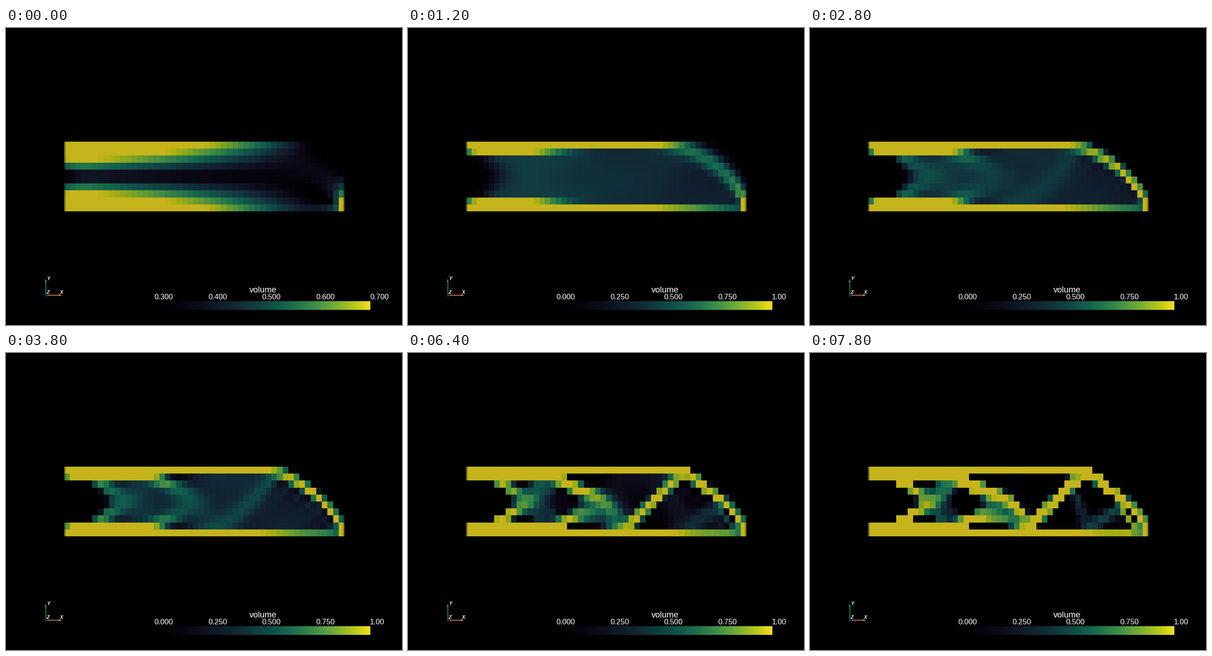
Write a matplotlib script that moves like this. It is 864x648 px and loops after 8000 ms.

```python
import numpy as np
import matplotlib.pyplot as plt
from matplotlib.animation import FuncAnimation
from matplotlib.patches import Polygon, Rectangle

W, H, DPI = 864, 648, 100
NX, NY = 50, 10
DX, DY = 0.8, 1.0
FRAMES, STEP = 40, 200
LEFT, RIGHT, TOP, BOTTOM = 127, 737.2, 248, 400
PT = 72 / DPI


def element_stiffness(a, b, nu=0.3):
    """Plane-stress stiffness of an a by b biquadratic element."""
    d = np.array([[1, nu, 0], [nu, 1, 0], [0, 0, (1 - nu) / 2]]) / (1 - nu**2)
    points, weights = np.polynomial.legendre.leggauss(3)

    def shape(t):
        return np.array([t * (t - 1) / 2, 1 - t * t, t * (t + 1) / 2])

    def slope(t):
        return np.array([t - 0.5, -2 * t, t + 0.5])

    k = np.zeros((18, 18))
    for p, wp in zip(points, weights):
        for q, wq in zip(points, weights):
            nx = np.outer(slope(p), shape(q)).ravel() * 2 / a
            ny = np.outer(shape(p), slope(q)).ravel() * 2 / b
            m = np.zeros((3, 18))
            m[0, 0::2] = m[2, 1::2] = nx
            m[1, 1::2] = m[2, 0::2] = ny
            k += m.T @ d @ m * a * b / 4 * wp * wq
    return k


KE = element_stiffness(DX, DY)
SIDE = 2 * (2 * NY + 1)
STRIP = 3 * SIDE
_c, _r = np.divmod(np.arange(9), 3)
_nodes = _c * (2 * NY + 1) + _r + 2 * np.arange(NY)[:, None]
DOFS = np.stack([2 * _nodes, 2 * _nodes + 1], 2).reshape(NY, 18)


def strain_energy(stiff):
    """Energy per unit modulus in each element, one column strip at a time."""
    flat = (DOFS[:, :, None] * STRIP + DOFS[:, None, :]).ravel()
    strips = [np.bincount(flat, (stiff[:, j, None, None] * KE).ravel(),
                          STRIP**2).reshape(STRIP, STRIP) for j in range(NX)]
    links, inner = [], 2 * SIDE
    carry = None
    for k in strips:
        start = SIDE if carry is None else 0
        if carry is not None:
            k[:SIDE, :SIDE] += carry
        link = np.zeros((inner, SIDE))
        link[start:] = -np.linalg.solve(k[start:inner, start:inner],
                                        k[start:inner, inner:])
        carry = k[inner:, inner:] + k[inner:, start:inner] @ link[start:]
        carry = (carry + carry.T) / 2
        links.append(link)
    load = np.zeros(SIDE)
    load[-1] = 1
    edge = np.linalg.solve(carry, load)
    energy = np.zeros((NY, NX))
    for j in reversed(range(NX)):
        u = np.concatenate([links[j] @ edge, edge])
        ue = u[DOFS]
        energy[:, j] = np.sum(ue @ KE * ue, 1)
        edge = u[:SIDE]
    return energy


def optimise(steps, fraction=0.5, move=0.2, low=1e-4, power=3, damping=0.25):
    """Densities of a cantilever with a corner load after each update."""
    rho = np.full((NY, NX), fraction)
    history = []
    for _ in range(steps):
        energy = strain_energy(1e-9 + rho**power)
        gain = power * rho ** (power - 1) * np.maximum(energy, 1e-30)
        lo, hi = 1e-12, 1e12
        while hi / lo > 1 + 1e-9:
            mid = np.sqrt(lo * hi)
            new = np.clip(rho * (gain / mid) ** damping,
                          np.maximum(low, rho - move), np.minimum(1, rho + move))
            if new.mean() > fraction:
                lo = mid
            else:
                hi = mid
        rho = new
        history.append(rho)
    return history


def shade(t, layers=1.0, light=1.0):
    """Viridis over black, with opacity rising along the scale."""
    rgb = plt.get_cmap("viridis")(t)[..., :3]
    return rgb * (1 - (1 - t) ** layers)[..., None] * light


def number(v):
    return "1.00" if v > 0.9995 else f"{v:.3f}"


fields = optimise(FRAMES)

fig = plt.figure(figsize=(W / DPI, H / DPI), dpi=DPI, facecolor="black")
ax = fig.add_axes([0, 0, 1, 1])
ax.set_xlim(0, W)
ax.set_ylim(H, 0)
ax.axis("off")


def image(rgb, x0, x1, y0, y1):
    return ax.imshow(rgb, extent=(x0, x1, y1, y0), aspect="auto",
                     interpolation="nearest", zorder=2)


def label(x, y, s, px, **kw):
    return ax.text(x, y, s, color="white", fontsize=px * PT, va="baseline",
                   family="Liberation Sans", **kw)


def arrow(dx, dy, color):
    x, y = 86.5, 583
    ax.plot([x, x + 30 * dx], [y, y + 30 * dy], color=color, lw=1.3)
    tx, ty = x + 36 * dx, y + 36 * dy
    bx, by = x + 29 * dx, y + 29 * dy
    ax.add_patch(Polygon([(tx, ty), (bx + 2.4 * dy, by + 2.4 * dx),
                          (bx - 2.4 * dy, by - 2.4 * dx)], color=color, lw=0))


cells = image(np.zeros((NY, NX, 3)), LEFT, RIGHT, TOP, BOTTOM)
image(shade(np.linspace(0, 1, 256), light=0.96)[None], 324, 795, 596, 615)
for x in (LEFT, RIGHT - 2.5):
    ax.add_patch(Rectangle((x, TOP), 2.5, BOTTOM - TOP, color="black",
                           alpha=0.35, lw=0, zorder=3))

arrow(0, -1, "#2b8a60")
arrow(1, 0, "#d27c42")
ax.plot(86.5, 583, "o", color="#1b2a55", ms=3.6)
for x, y, s in ((89, 550.5, "Y"), (117.5, 579.5, "X"), (88.5, 579.5, "Z")):
    label(x, y, s, 10, weight="bold", style="italic")

label(561, 577, "volume", 18.6, ha="center")
ticks = [label(323.5 + 117.6 * i, 591.5, "", 16.4) for i in range(5)]


def draw(i):
    rho = fields[i]
    lo, hi = rho.min(), rho.max()
    cells.set_data(np.clip(shade((rho - lo) / (hi - lo), 1.5, 0.78), 0, 1))
    for t, v in zip(ticks, np.linspace(lo, hi, 5)):
        t.set_text(number(v))
    return [cells, *ticks]


anim = FuncAnimation(fig, draw, frames=FRAMES, interval=STEP,
                     init_func=lambda: draw(0), repeat=True, repeat_delay=0)
plt.show()
```
